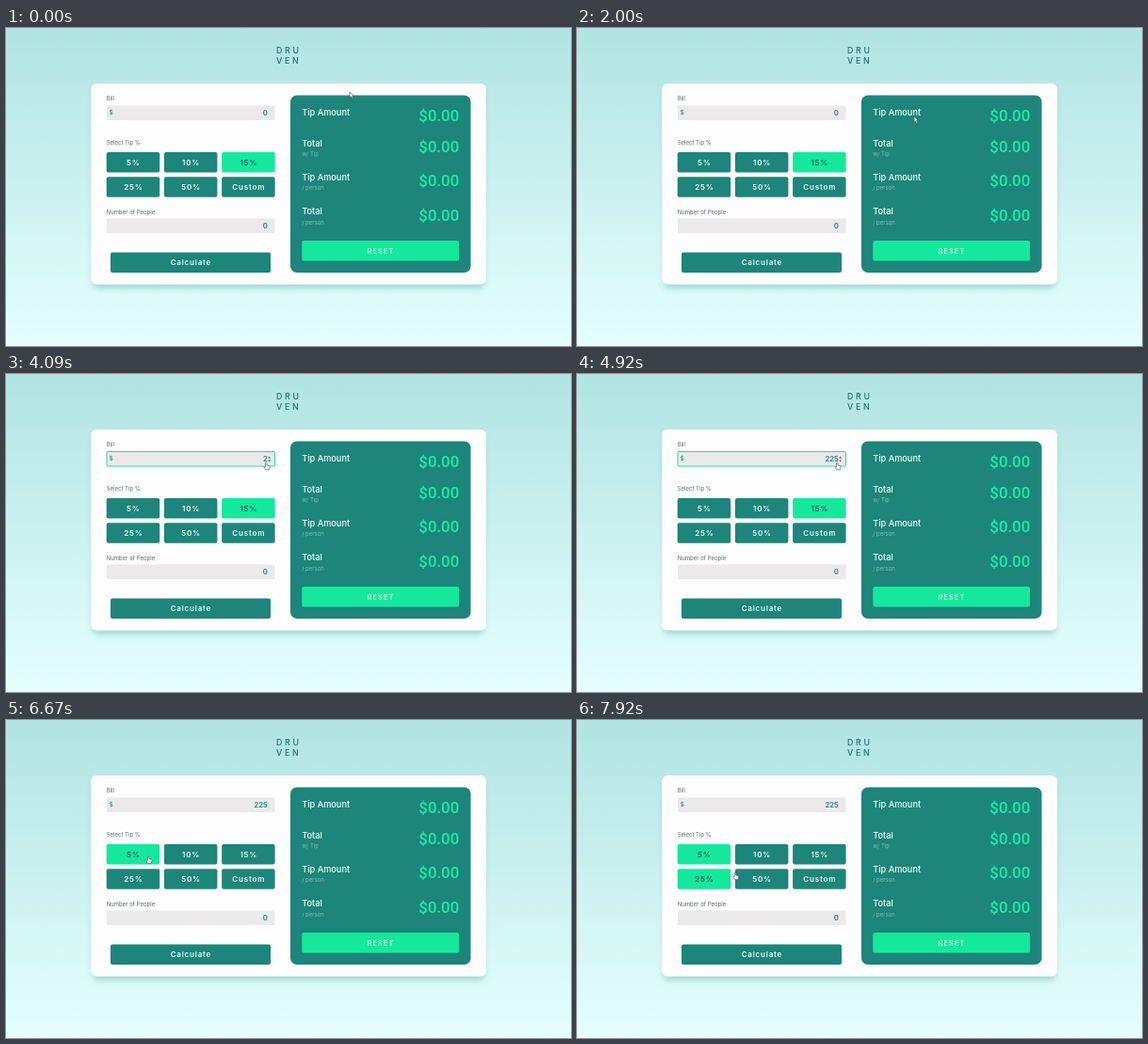
An HTML page for the animation above (8000 ms loop, 600 by 338 pixels).

```html
<!DOCTYPE html>
<html lang="en">
<head>
<meta charset="utf-8">
<title>Tip calculator</title>
<style>
  html, body { margin: 0; width: 100%; height: 100%; overflow: hidden; }
  svg { display: block; width: 100vw; height: 100vh; font-family: Inter, sans-serif; }
  .logo { font-size: 8.8px; font-weight: 500; letter-spacing: 2.7px; fill: #1c7770; }
  .label { font-size: 6px; fill: #5d6a6b; }
  .field { fill: #ebe9ea; }
  .field.hover { stroke: #25dfa5; stroke-width: 1; }
  .value { font-size: 7.7px; font-weight: 600; fill: #1e857b; text-anchor: end; }
  .dollar { font-size: 6px; font-weight: 500; fill: #1e857b; }
  .button rect { fill: #1d857a; }
  .button text { font-size: 8px; font-weight: 600; letter-spacing: .8px; text-anchor: middle; fill: #e6fffa; }
  .button.lit rect { fill: #15e89d; }
  .button.lit text { fill: #125e57; }
  .button.reset rect { fill: #15e89d; }
  .button.reset text { font-size: 7.2px; font-weight: 500; letter-spacing: 1.2px; }
  .name { font-size: 9.2px; font-weight: 500; fill: #f0fffc; }
  .note { font-size: 6px; fill: #85beb7; }
  .amount { font: 500 16.8px Roboto, sans-serif; fill: #19ebac; text-anchor: end; }
  .cursor path { fill: #fff; stroke: #3c4a4c; stroke-width: .6; stroke-linejoin: round; }
</style>
</head>
<body>
<svg viewBox="0 0 600 338" preserveAspectRatio="none">
  <defs>
    <linearGradient id="sky" x2="0" y2="1">
      <stop stop-color="#b1e3e3"/>
      <stop offset="1" stop-color="#e5fffd"/>
    </linearGradient>
    <filter id="soft" x="-10%" y="-10%" width="120%" height="125%">
      <feGaussianBlur stdDeviation="3"/>
    </filter>
  </defs>
  <rect width="600" height="338" fill="url(#sky)"/>
  <text class="logo" x="287" y="27">DRU</text>
  <text class="logo" x="287" y="38">VEN</text>

  <rect x="92" y="64" width="416" height="213" rx="6" fill="#72b8b3" opacity=".5" filter="url(#soft)"/>
  <rect x="90" y="59" width="420" height="213.5" rx="6" fill="#fdfdfd"/>
  <rect x="302" y="71.5" width="191.5" height="188.5" rx="7" fill="#1d857a"/>

  <text class="label" x="106.7" y="77">Bill</text>
  <text class="label" x="106.7" y="124">Select Tip %</text>
  <text class="label" x="106.7" y="197.5">Number of People</text>

  <rect id="billField" class="field" x="107" y="82.5" width="178.5" height="15.5" rx="1"/>
  <text class="dollar" x="109.8" y="92">$</text>
  <text id="bill" class="value" x="277.8" y="92.9">0</text>
  <path id="spinner" d="M278.2 89.4l1.4-2 1.4 2zM278.2 91.4l1.4 2 1.4-2z" fill="#4b5557"/>
  <rect class="field" x="107" y="202.5" width="178.5" height="15.5" rx="1"/>
  <text class="value" x="277.8" y="213">0</text>

  <g id="parts"></g>

  <g id="cursor" class="cursor">
    <path id="arrow" d="M0 0V6L1.4 4.8 2.4 7 3.4 6.5 2.5 4.4H4.2Z"/>
    <path id="hand" d="M-.7.4Q0-.5.7.4V2.9L3.2 3.5Q4 3.8 3.8 4.7L3.1 7.7H-.5L-2.4 4.9Q-2.2 3.8-.7 4.7Z"/>
  </g>
</svg>
<script>
const LOOP = 8000, HOVER_LAG = 90, PICK_TIME = 6550;
const $ = id => document.getElementById(id);

function add(parent, tag, attrs, text = '') {
  const el = document.createElementNS('http://www.w3.org/2000/svg', tag);
  for (const key in attrs) el.setAttribute(key, attrs[key]);
  el.textContent = text;
  return parent.appendChild(el);
}

function addButton(label, x, y, width, extra = '') {
  const height = 21.5;
  const el = add($('parts'), 'g', { class: 'button ' + extra });
  add(el, 'rect', { x, y, width, height, rx: 2 });
  add(el, 'text', { x: x + width / 2 + .4, y: y + 13.6 }, label);
  return { el, label, x, y, width, height };
}

const tips = ['5%', '10%', '15%', '25%', '50%', 'Custom'].map((label, i) =>
  addButton(label, 106.7 + i % 3 * 61.2, 132 + (i > 2) * 26.2, 56.5));
addButton('Calculate', 111, 238.5, 170);
addButton('RESET', 314.3, 226, 166.7, 'reset');

[['Tip Amount', '', 93, 99], ['Total', 'w/ Tip', 125.7, 132],
 ['Tip Amount', '/ person', 162, 168], ['Total', '/ person', 198.4, 204.5]]
  .forEach(([name, note, y, amountY]) => {
    add($('parts'), 'text', { class: 'name', x: 314.2, y }, name);
    add($('parts'), 'text', { class: 'note', x: 314.2, y: y + 10.4 }, note);
    add($('parts'), 'text', { class: 'amount', x: 481.2, y: amountY }, '$0.00');
  });

// Pointer stops: time, x, y
const stops = [
  [0, 365, 68], [500, 365, 68], [750, 410.5, 67], [1000, 410.5, 67],
  [1750, 375, 92], [2420, 320, 99], [2900, 276.3, 94], [5300, 276.3, 94],
  [6050, 203, 143], [6170, 203, 143], [6420, 134, 144], [6600, 134, 144],
  [6880, 248, 148.5], [7020, 248, 148.5], [7300, 254, 166], [7560, 198, 167],
  [7790, 152, 165], [7920, 168, 162], [8000, 168, 162]
];

function pointerAt(time) {
  const t = Math.max(0, time);
  const i = Math.max(1, stops.findIndex(s => s[0] >= t));
  const [t0, x0, y0] = stops[i - 1], [t1, x1, y1] = stops[i];
  const k = (1 - Math.cos(Math.PI * (t - t0) / (t1 - t0))) / 2;
  return [x0 + (x1 - x0) * k, y0 + (y1 - y0) * k];
}

const inside = ([px, py], { x, y, width, height }) =>
  px >= x && px <= x + width && py >= y && py <= y + height;
const show = (el, on) => el.style.display = on ? '' : 'none';
const billBox = { x: 107, y: 82, width: 179, height: 16 };

function draw(t) {
  const [x, y] = pointerAt(t), hot = pointerAt(t - HOVER_LAG);
  const onBill = inside(hot, billBox);
  const hovered = tips.find(b => inside(hot, b));
  const picked = t < PICK_TIME ? '15%' : '5%';

  tips.forEach(b => b.el.classList.toggle('lit', b === hovered || b.label === picked));
  $('billField').classList.toggle('hover', onBill);
  show($('spinner'), onBill);
  $('bill').textContent = t < 4000 ? '0' : '225'.slice(0, t < 4330 ? 1 : t < 4750 ? 2 : 3);

  const pointing = onBill || !!hovered;
  show($('hand'), pointing);
  show($('arrow'), !pointing);
  $('cursor').setAttribute('transform', `translate(${x} ${y})`);
}

const start = performance.now();
function frame() {
  draw((performance.now() - start) % LOOP);
  requestAnimationFrame(frame);
}
frame();
</script>
</body>
</html>
```
